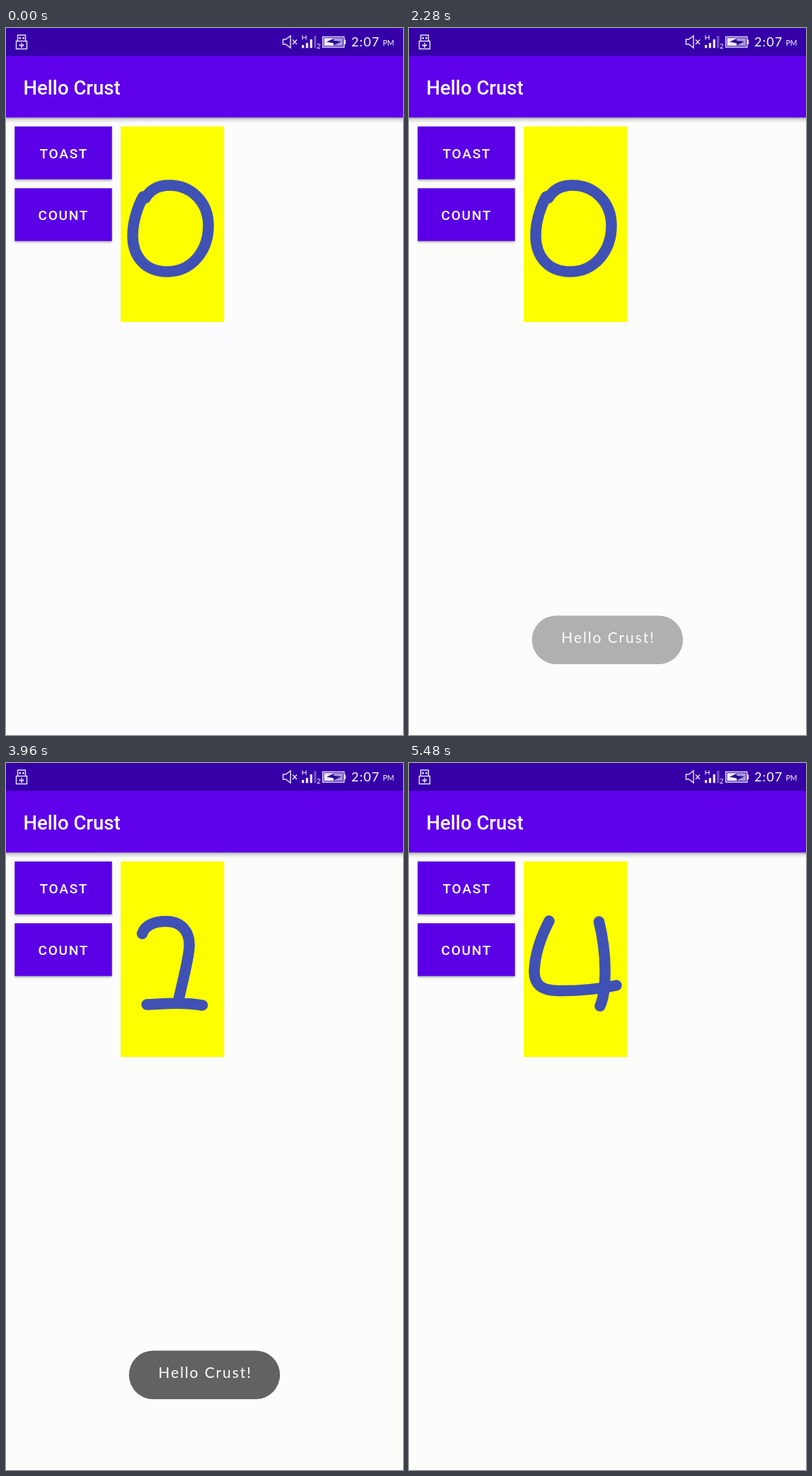
These frames come from a looping animation (561 by 998 pixels, 5530 ms). An HTML page:

```html
<!DOCTYPE html>
<html lang="en">
<head>
<meta charset="utf-8">
<title>Counter app</title>
<style>
html, body { margin: 0; width: 100%; height: 100%; overflow: hidden; background: #fcfdfb; }
svg { display: block; width: 561px; height: 998px; }
text { fill: #fff; }

.title, .label { font-family: Roboto, sans-serif; font-weight: 500; }
.title { font-size: 27.5px; }
.label { font-size: 19.1px; letter-spacing: 1.7px; }
.hand { font-family: Lato, sans-serif; }

.digit { fill: none; stroke: #3f51b5; stroke-width: 15.5; stroke-linecap: round; stroke-linejoin: round; }
.rest { fill: #000; opacity: .32; filter: blur(1.6px); }
.raised { fill: #000; opacity: 0; filter: blur(3px); }

/* One 5.53 s cycle drives everything. */
.page, .digit, .raised, .toast { animation: 5.53s linear infinite; }
.page { animation-name: page; animation-timing-function: step-end; }
.digit { animation-timing-function: step-end; }
.zero { animation-name: zero; }
.one { animation-name: one; }
.two { animation-name: two; }
.three { animation-name: three; }
.four { animation-name: four; }
.press-toast { animation-name: press-toast; }
.press-count { animation-name: press-count; }
.toast { animation-name: toast; }

@keyframes page { 0% { fill: #fcfcfe; } 34.358%, 100% { fill: #fcfdfb; } }

@keyframes zero { 0% { opacity: 1; } 68.716%, 100% { opacity: 0; } }
@keyframes one { 0% { opacity: 0; } 68.716% { opacity: 1; } 82.459%, 100% { opacity: 0; } }
@keyframes two { 0% { opacity: 0; } 82.459% { opacity: 1; } 96.022%, 100% { opacity: 0; } }
@keyframes three { 0% { opacity: 0; } 96.022% { opacity: 1; } 97.107%, 100% { opacity: 0; } }
@keyframes four { 0% { opacity: 0; } 97.107%, 100% { opacity: 1; } }

@keyframes press-toast {
  0%, 34% { opacity: 0; }
  35.986%, 36.89% { opacity: .34; }
  38.879%, 100% { opacity: 0; }
}
@keyframes press-count {
  0%, 66.546% { opacity: 0; }
  68.354%, 69.62% { opacity: .34; }
  71.609%, 81.736% { opacity: 0; }
  83.18%, 84.358% { opacity: .34; }
  86.257%, 94.937% { opacity: 0; }
  96.564%, 97.468% { opacity: .34; }
  99.096%, 100% { opacity: 0; }
}
@keyframes toast {
  0% { opacity: 0; }
  38.879% { opacity: 0; animation-timing-function: cubic-bezier(.333, .667, .667, 1); }
  47.016% { opacity: 1; }
  73.96% { opacity: 1; animation-timing-function: cubic-bezier(.333, 0, .667, .333); }
  82.64%, 100% { opacity: 0; }
}
</style>
</head>
<body>
<svg viewBox="0 0 561 998">
  <defs>
    <linearGradient id="bar-shadow" x2="0" y2="1">
      <stop stop-color="#000" stop-opacity=".36"/>
      <stop offset=".4" stop-color="#000" stop-opacity=".13"/>
      <stop offset="1" stop-color="#000" stop-opacity="0"/>
    </linearGradient>
  </defs>

  <rect class="page" width="561" height="998"/>

  <!-- App bar -->
  <rect y="126" width="561" height="8" fill="url(#bar-shadow)"/>
  <rect y="39" width="561" height="87.3" fill="#5e00e9"/>
  <text class="title" x="24.5" y="93.7">Hello Crust</text>

  <!-- Status bar -->
  <rect width="561" height="39.3" fill="#3500a8"/>
  <g fill="none" stroke="#e6def6" stroke-width="1.5">
    <path d="M16.5 18.5V10h11v8.5M14.5 18.5h15v11h-15zM22 21v7M19.5 23v1.8h5V23"/>
    <path d="M391.5 16h4l6.5-5v17l-6.5-5h-4zM405 16.5l6 6.5M411 16.5l-6 6.5"/>
    <path d="M419 10.5v6M424 10.5v6M419 13.5h5" stroke-width="1.2"/>
    <path d="M447.7 12.5h30v14.5h-30zM479.3 16.5v6.5"/>
  </g>
  <g fill="#f0eafa">
    <path d="M18.5 13h2.4v2.4h-2.4zM23.3 13h2.4v2.4h-2.4z"/>
    <path d="M418 24h3.2v4.3H418zM423.8 21h3.2v7.3h-3.2zM429.6 16h3.2v12.3h-3.2z"/>
    <path d="M449.5 14.2h14v11h-14z"/>
  </g>
  <path d="M435.2 11h3.2v17.3h-3.2z" fill="#7554c0"/>
  <path d="M463.5 14.2h12.5v11h-12.5z" fill="#a797dc"/>
  <path d="M453 19.5l10-4.5v3l11 1-11 5.500v-3z" fill="#2c0890"/>
  <g class="hand">
    <text x="439" y="29" font-size="9.500">2</text>
    <text x="488" y="26" font-size="18" letter-spacing="1.1">2:07</text>
    <text x="532.500" y="25" font-size="10.500">PM</text>
  </g>

  <!-- Buttons -->
  <rect class="rest" x="12.500" y="141" width="137" height="74.500"/>
  <rect class="raised press-toast" x="11" y="142" width="140" height="76"/>
  <rect x="12.300" y="139" width="137.400" height="74.500" fill="#5b00e6"/>
  <text class="label" x="47.500" y="184">TOAST</text>

  <rect class="rest" x="12.500" y="228" width="137" height="74.500"/>
  <rect class="raised press-count" x="11" y="229" width="140" height="76"/>
  <rect x="12.300" y="226.200" width="137.400" height="74.500" fill="#5b00e6"/>
  <text class="label" x="45.500" y="271.300">COUNT</text>

  <!-- Counter -->
  <rect x="162" y="139" width="146.300" height="276" fill="#fdfe00"/>
  <path class="digit zero" d="M197 240C204 228 216 222 231 222C262 222 286 246 286 279C286 315 262 344 228 344C196 344 179 322 179 293C179 272 187 250 194 238"/>
  <path class="digit one" d="M192.500 241C196 229 210 223.500 226 223.500C247 223.500 260 237 259 259C258 278 250 306 244 334M199 341C220 340 250 337 277.500 342"/>
  <path class="digit two" d="M183 249C186 232 205 221 224 221C250 221 279 238 279 263C279 292 244 333 207 339C225 347 255 345 277 336"/>
  <path class="digit three" d="M185 232C210 220 265 214 262 246C260 268 235 274 215 276C250 274 288 284 284 312C280 345 215 352 180 336"/>
  <path class="digit four" d="M198 223C186 246 178 268 177 294C177 312 186 321 210 321.500C240 322 268 319 293 314M268.500 224C276 255 279 285 276 317C275 329 273 336 270 343"/>

  <!-- Toast -->
  <g class="toast">
    <rect x="173.700" y="829.500" width="213.500" height="68.500" rx="34.250" fill="#626262"/>
    <text class="hand" x="281.500" y="868" font-size="21" letter-spacing="1.900" text-anchor="middle">Hello Crust!</text>
  </g>
</svg>
</body>
</html>
```
